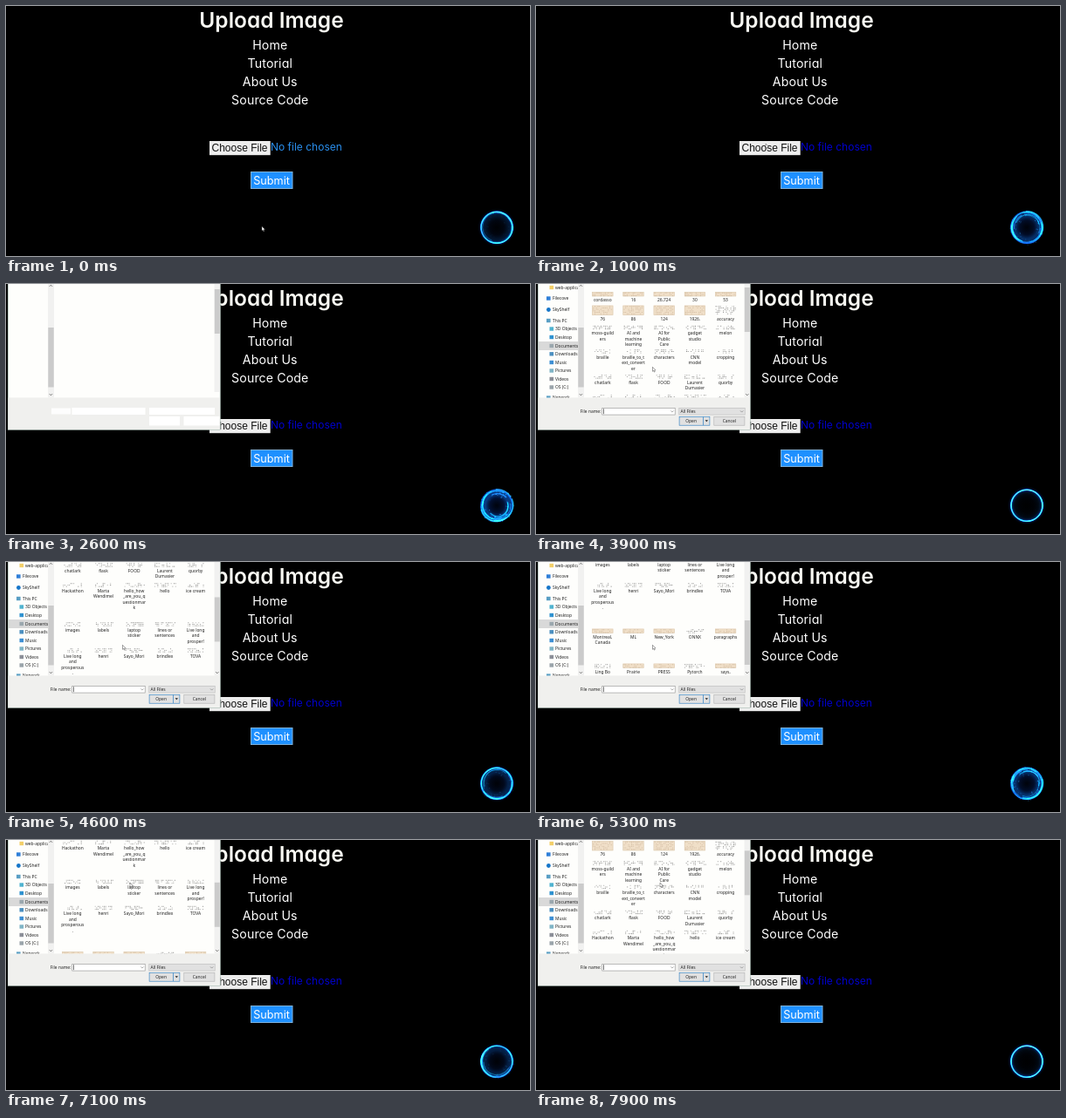
An HTML page with a canvas for the animation above (8000 ms loop, 600 px wide and 287 px high).

```html
<!DOCTYPE html>
<html lang="en">
<head>
<meta charset="utf-8">
<title>Upload Image</title>
<style>
html, body { margin: 0; width: 100%; height: 100%; overflow: hidden; background: #000; }
svg, canvas { position: absolute; left: 0; top: 0; width: 600px; height: 287px; }
.page { font-family: Poppins, Inter, "Open Sans", sans-serif; font-feature-settings: "cv11"; fill: #fff; text-anchor: middle; }
.title { font-size: 24.5px; font-weight: 600; fill: #f8f8f2; }
.nav { font-size: 14.2px; letter-spacing: .1px; }
.status { font-size: 12px; text-anchor: start; }
.submit { font-size: 12.7px; }
.pick { font: 12px "Liberation Sans", Arial, sans-serif; fill: #111; }
</style>
</head>
<body>
<svg class="page" viewBox="0 0 600 287">
  <text class="title" x="304" y="25.3">Upload Image</text>
  <g class="nav">
    <text x="302.3" y="50">Home</text>
    <text x="302.3" y="71">Tutorial</text>
    <text x="302.3" y="92">About Us</text>
    <text x="302.3" y="113">Source Code</text>
  </g>
  <rect id="pick" x="233" y="155" width="69.7" height="16.2"/>
  <text class="pick" x="267.5" y="167.3">Choose File</text>
  <text id="status" class="status" x="303" y="166.3">No file chosen</text>
  <rect x="280.5" y="190.5" width="47.5" height="19" fill="#1e90ff" stroke="#7fb2de"/>
  <text class="submit" x="304" y="204.6">Submit</text>
</svg>
<canvas id="stage" width="600" height="287"></canvas>
<script>
const LOOP = 8000, TAU = Math.PI * 2;
const canvas = document.getElementById('stage');
const pick = document.getElementById('pick');
const status = document.getElementById('status');
const scale = Math.max(1, window.devicePixelRatio || 1);
canvas.width = 600 * scale;
canvas.height = 287 * scale;
const g = canvas.getContext('2d');
g.scale(scale, scale);

const FONT = '4.9px "Segoe UI", "Open Sans", "Noto Sans", sans-serif';

// [label centre y, thumbnail kinds (p = page, d = dots), labels]
const ROWS = [
  [18.5, 'ppppp', ['cordasso', '16', '26,724', '30', '53']],
  [40, 'ppppd', ['76', '86', '124', '1926.', 'accuracy']],
  [56.5, 'ddddd', ['moss-guild|ers', 'AI and|machine|learning', 'AI for|Public|Care', 'gadget|studio', 'melon']],
  [84, 'ddddd', ['braille', 'braille_to_t|ext_convert|er', 'characters', 'CNN|model', 'cropping']],
  [113, 'ddddd', ['chatlark', 'flask', 'FOOD', 'Laurent|Dumasier', 'quorby']],
  [136, 'ddddd', ['Hackathon', 'Marta|Wendimel', 'hello_how|_are_you_q|uestionmar|k', 'hello', 'ice cream']],
  [181, 'ddddd', ['images', 'labels', 'laptop|sticker', 'lines or|sentences', 'Live long|and|prosper!']],
  [211, 'ddddd', ['Live long|and|prosperous|.', 'henri', 'Sayo_Mori', 'brindlex', 'TOVA']],
  [264, 'pppdp', ['Montreal,|Canada', 'ML', 'New_York', 'ONNX', 'paragraphs']],
  [304, 'dppdp', ['Ling Bo', 'Prairie', 'PRESS', 'Pytorch', 'says,']]
];

// [centre y, text, icon colour, indent, round icon]
const SIDE = [
  [4, 'web-applica', '#f3cf69', 1],
  [16.5, 'Filecove', '#2f7fd8', 0],
  [29.5, 'SkyShelf', '#1676c9', 0, true],
  [42, 'This PC', '#5a9fc4', 0],
  [51.5, '3D Objects', '#4fb3d0', 1],
  [61, 'Desktop', '#2f92d0', 1],
  [71, 'Documents', '#9aa7ae', 1],
  [80.3, 'Downloads', '#4b8fc0', 1],
  [90, 'Music', '#3d8fd4', 1],
  [99.5, 'Pictures', '#7fb4c6', 1],
  [109, 'Videos', '#8b8f98', 1],
  [118.5, 'OS (C:)', '#9aa4aa', 1],
  [130.6, 'Network', '#5a9fc4', 0]
];

const clamp = v => Math.max(0, Math.min(1, v));
const ease = v => { v = clamp(v); return v * v * (3 - 2 * v); };
const noise = n => { const s = Math.sin(n * 127.1 + 11.7) * 43758.5453; return s - Math.floor(s); };

// Piecewise interpolation over [time, value] pairs
function track(keys, t) {
  if (t <= keys[0][0]) return keys[0][1];
  for (let i = 1; i < keys.length; i++) {
    const [a, va] = keys[i - 1], [b, vb] = keys[i];
    if (t <= b) return va + (vb - va) * ease((t - a) / (b - a));
  }
  return keys[keys.length - 1][1];
}

function box(x, y, w, h, fill, edge) {
  g.fillStyle = fill;
  g.fillRect(x, y, w, h);
  if (edge) {
    g.strokeStyle = edge;
    g.lineWidth = .6;
    g.strokeRect(x + .3, y + .3, w - .6, h - .6);
  }
}

function label(text, x, y, align = 'left') {
  g.font = FONT;
  g.textAlign = align;
  g.textBaseline = 'alphabetic';
  g.fillStyle = '#222';
  g.fillText(text, x, y + 1.7);
}

function chevron(x, y, dir, color = '#555') {
  g.strokeStyle = color;
  g.lineWidth = .8;
  g.beginPath();
  g.moveTo(x - 1.6, y - .8 * dir);
  g.lineTo(x, y + .8 * dir);
  g.lineTo(x + 1.6, y - .8 * dir);
  g.stroke();
}

function clip(x, y, w, h, draw) {
  g.save();
  g.beginPath();
  g.rect(x, y, w, h);
  g.clip();
  draw();
  g.restore();
}

function thumb(kind, cx, bottom, h, seed) {
  const page = kind === 'p', w = page ? 24 : 18 + noise(seed) * 8;
  const x = cx - w / 2, y = bottom - h;
  if (page) box(x, y, w, h, '#f0dfc8', '#dccbb2');
  for (let row = 0; row < h - 1; row += 1.7) {
    for (let i = 0; i < w - 2; i += 1.7) {
      const n = noise(seed * 31 + row * 7.3 + i * 1.9);
      if (n < .5) continue;
      g.fillStyle = page ? 'rgba(150,115,85,.3)' : `rgba(70,70,70,${n * .75})`;
      g.fillRect(x + 1 + i, y + .6 + row, 1, .9);
    }
  }
}

function files(scroll) {
  ROWS.forEach(([top, kinds, names], r) => {
    const y = top - scroll;
    if (y < -30 || y > 145) return;
    names.forEach((name, c) => {
      const cx = 76.3 + c * 35.2;
      thumb(kinds[c], cx, y - 4.3, r === 1 ? 11 : 5, r * 5 + c + 1);
      name.split('|').forEach((line, i) => label(line, cx, y + i * 6.5, 'center'));
    });
  });
}

function sidebar() {
  box(3, 66, 45, 10, '#d9d9d9');
  for (const [y, text, color, indent, round] of SIDE) {
    const x = indent ? 15.5 : 12;
    g.fillStyle = color;
    if (round) {
      g.beginPath();
      g.arc(x + 2.4, y, 2.4, 0, TAU);
      g.fill();
    } else {
      g.fillRect(x, y - 2.2, 4.6, 4.4);
    }
    label(text, indent ? 22 : 19, y);
  }
}

function dialog(ready, scroll) {
  box(2, -2, 243.5, 169.5, '#fefefc', '#93aaa0');
  box(2.6, 130.5, 242.4, 36.3, '#f0f0ee');
  box(48, 0, 7, 130.5, '#f1f1f0');
  box(48.3, 50, 6.4, 68.5, '#cbcbcb');
  chevron(51.4, 2, -1);
  chevron(51.4, 127, 1);
  box(238.5, 0, 6.5, 124 + (ready ? 6.5 : 0), '#f1f1f0');
  const end = ready ? 55 + scroll * .354 : 57;
  box(238.8, end - 51, 6, 51, '#cbcbcb');

  if (!ready) {
    box(52, 142.5, 22, 7, '#fdfdfd');
    box(75.5, 142, 84, 8, '#fff');
    box(164, 142, 75, 8, '#fff');
    box(164, 152, 35, 10.5, '#fff');
    box(203.5, 152, 41, 10.5, '#fff');
    return;
  }

  clip(2.6, 0, 45.4, 130.5, sidebar);
  clip(55, 0, 183.5, 130.5, () => files(scroll));
  chevron(241.8, 127, 1);

  label('File name:', 74.3, 146, 'right');
  box(75.5, 142, 84, 8.4, '#fff', '#8a8a8a');
  box(77, 143.2, .6, 6, '#222');
  chevron(156, 146.3, 1, '#999');
  box(163.5, 142, 76, 8.4, '#e1e1e1', '#bdbdbd');
  label('All Files', 165.6, 146.2);
  chevron(235.6, 146.3, 1, '#888');
  box(163.8, 152, 35.4, 10.5, '#e1e1e1', '#2b7fc4');
  box(191, 152.4, .7, 9.7, '#2b7fc4');
  label('Open', 177.6, 157.2, 'center');
  g.beginPath();
  g.moveTo(193.6, 156.3);
  g.lineTo(197, 156.3);
  g.lineTo(195.3, 158.3);
  g.fill();
  box(203.5, 152, 35.7, 10.5, '#e1e1e1', '#b4b4b4');
  label('Cancel', 221.3, 157.2, 'center');
}

function pointer(x, y) {
  g.save();
  g.translate(x, y);
  g.beginPath();
  [[0, 0], [0, 5], [1.1, 4.1], [1.9, 5.8], [2.7, 5.4], [2, 3.8], [3.5, 3.6]].forEach(p => g.lineTo(...p));
  g.closePath();
  g.fillStyle = '#fff';
  g.fill();
  g.strokeStyle = '#444';
  g.lineWidth = .5;
  g.stroke();
  g.restore();
}

// A rim that breaks up into swirling wisps and closes again every 4 s
function ring(t) {
  const phase = t % 4000, spin = phase / 4000 * TAU;
  const power = track([[0, .3], [1300, .75], [2000, 1], [2600, .9], [3400, .25], [3850, .05], [4000, .3]], phase);
  g.save();
  g.translate(562, 254.3);
  g.globalCompositeOperation = 'lighter';

  const glow = g.createRadialGradient(0, 0, 0, 0, 0, 19.5);
  glow.addColorStop(0, `rgba(0,15,60,${.25 * power})`);
  glow.addColorStop(.42, `rgba(5,40,125,${.45 * power})`);
  glow.addColorStop(.65, `rgba(10,85,190,${.75 * power})`);
  glow.addColorStop(.9, `rgba(15,100,220,${.12 + .5 * power})`);
  glow.addColorStop(1, 'rgba(0,60,200,0)');
  g.fillStyle = glow;
  g.beginPath();
  g.arc(0, 0, 19.5, 0, TAU);
  g.fill();

  g.shadowColor = '#0a50e0';
  g.shadowBlur = 3 * scale * (1 - .6 * power);
  g.strokeStyle = `rgba(30,125,245,${1 - .75 * power})`;
  g.lineWidth = 1.6;
  g.beginPath();
  g.arc(0, 0, 18, 0, TAU);
  g.stroke();
  g.shadowBlur = 0;
  g.strokeStyle = `rgba(110,210,255,${clamp(.7 - power)})`;
  g.lineWidth = .8;
  g.stroke();

  for (let i = 0; i < 16; i++) {
    const start = spin * (1 + i % 3) + noise(i) * TAU;
    const reach = .7 + noise(i + 20) * 1.9;
    const inset = power * Math.pow(noise(i + 40), 1.5) * 7;
    const drift = power * (noise(i + 100) - .5) * 2;
    g.strokeStyle = `rgba(${10 + i % 4 * 12},${130 + i % 5 * 22},245,${.12 + .45 * power})`;
    g.lineWidth = .7 + noise(i + 60) * 1.4 * power;
    g.beginPath();
    g.ellipse(drift, -drift, 18.3 - inset, 18.3 - inset * .8, start, 0, reach);
    g.stroke();
  }

  for (let i = 0; i < 60; i++) {
    const a = noise(i + 80) * TAU + spin * (1 + i % 2);
    const r = 19.5 - Math.pow(noise(i + 140), 1.5) * 10;
    g.fillStyle = `rgba(50,190,255,${power * power * noise(i + 200) * .7})`;
    g.fillRect(Math.cos(a) * r, Math.sin(a) * r, 1.1, 1.1);
  }
  g.restore();
}

function draw(t) {
  const pressed = t >= 1250 && t < 1500;
  status.setAttribute('fill', t >= 800 ? '#0000cc' : '#2a8fee');
  pick.setAttribute('fill', pressed ? '#d4d4d4' : '#ededed');

  g.clearRect(0, 0, 600, 287);
  ring(t);

  const scroll = track([
    [4100, 0], [4250, 52], [4400, 52], [4550, 103], [4700, 103], [4850, 155], [5000, 155], [5100, 178],
    [6800, 178], [6950, 126.5], [7150, 126.5], [7300, 75], [7550, 75], [7700, 23.5]
  ], t);
  if (t >= 2400) dialog(t >= 2900, scroll);

  if (t < 1500) {
    pointer(track([[100, 293], [800, 263]], t), track([[100, 253], [800, 158]], t));
  } else if (t >= 2900) {
    pointer(track([[2900, 150], [3500, 133.5], [5500, 133.5], [6100, 142]], t),
            track([[2900, 120], [3500, 95.3], [5500, 95.3], [6100, 49]], t));
  }
}

const begin = performance.now();
function frame() {
  draw((performance.now() - begin) % LOOP);
  requestAnimationFrame(frame);
}
draw(0);
requestAnimationFrame(frame);
</script>
</body>
</html>
```
